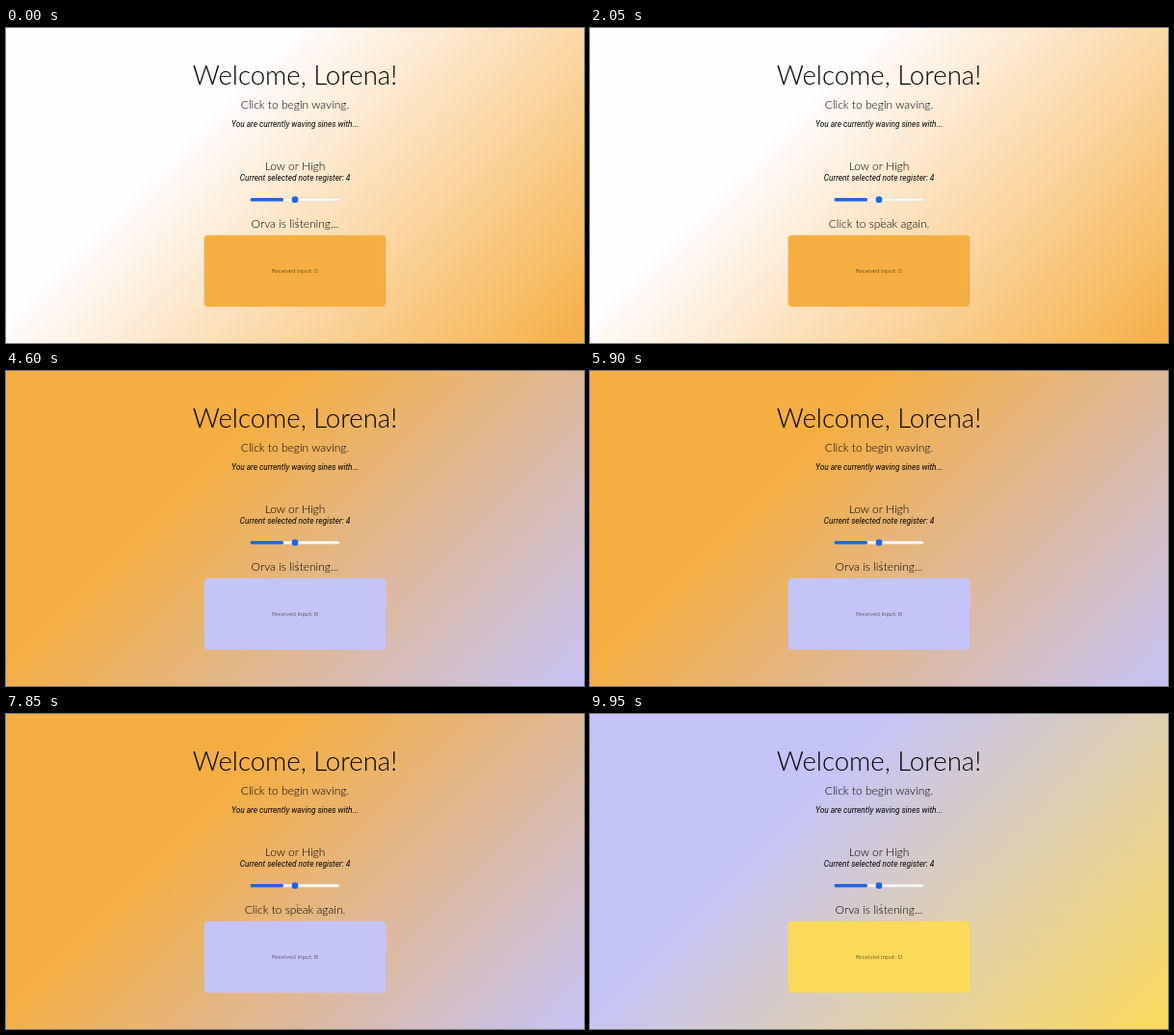
An HTML page for the animation above (10 s loop, 600 by 328 pixels).

```html
<!DOCTYPE html>
<html lang="en">
<head>
<meta charset="utf-8">
<title>Voice colours</title>
<style>
  html, body { margin: 0; width: 100%; height: 100%; overflow: hidden; }
  body { background: linear-gradient(135deg, var(--from) 32.5%, var(--to) 101%); }
  svg { display: block; width: 600px; height: 328px; }
  text { font: 300 12px Lato, sans-serif; text-anchor: middle; fill: #000; }
  .title { font-size: 27.6px; }
  .note { font: italic 400 8.3px Roboto, sans-serif; }
  .input { font-size: 6.4px; fill: #1c120a; }
  .box { fill: var(--to); }
</style>
</head>
<body>
<svg viewBox="0 0 600 328">
  <text class="title" x="300" y="58.8">Welcome, Lorena!</text>
  <text x="300" y="83.7">Click to begin waving.</text>
  <text class="note" x="300" y="103">You are currently waving sines with...</text>
  <text x="300" y="148">Low or High</text>
  <text class="note" x="300" y="159">Current selected note register: 4</text>

  <rect x="254" y="177.2" width="92.3" height="3" rx="1.5" fill="#fbfafa" stroke="#c8c2ba" stroke-width=".3"/>
  <rect x="253.5" y="177" width="34.5" height="3.4" rx="1.5" fill="#2465dc"/>
  <circle cx="300" cy="178.7" r="3.4" fill="#1766ee"/>

  <text id="status" x="300" y="207.7"></text>
  <rect class="box" x="205.7" y="215.7" width="188.6" height="74.6" rx="4"/>
  <text id="input" class="input" x="300" y="255"></text>
  <path d="M301 198.5h3M302.5 198.5v8M301 206.5h3" fill="none" stroke="#555" stroke-width=".6" opacity=".6"/>
</svg>
<script>
  const LOOP = 10000;
  const notes = [
    { at: 0, note: "G", from: "#fffdff", to: "#f5ae41" },
    { at: 2100, note: "B", from: "#f5ae41", to: "#c5c4f9" },
    { at: 8000, note: "D", from: "#c5c4f9", to: "#fcda59" },
  ];
  // Listening stops just before a note arrives and resumes soon after.
  const STOP = 250, RESUME = 300;
  const status = document.getElementById("status");
  const input = document.getElementById("input");
  const style = document.documentElement.style;

  function setText(node, value) {
    if (node.textContent !== value) node.textContent = value;
  }

  function draw(now) {
    const t = now % LOOP;
    const { note, from, to } = notes.filter(n => n.at <= t).pop();
    const paused = notes.some(({ at }) => at && t >= at - STOP && t < at + RESUME);
    style.setProperty("--from", from);
    style.setProperty("--to", to);
    setText(status, paused ? "Click to speak again." : "Orva is listening...");
    setText(input, "Received input: " + note);
  }

  const start = performance.now();
  function tick() {
    draw(performance.now() - start);
    requestAnimationFrame(tick);
  }
  tick();
</script>
</body>
</html>
```
